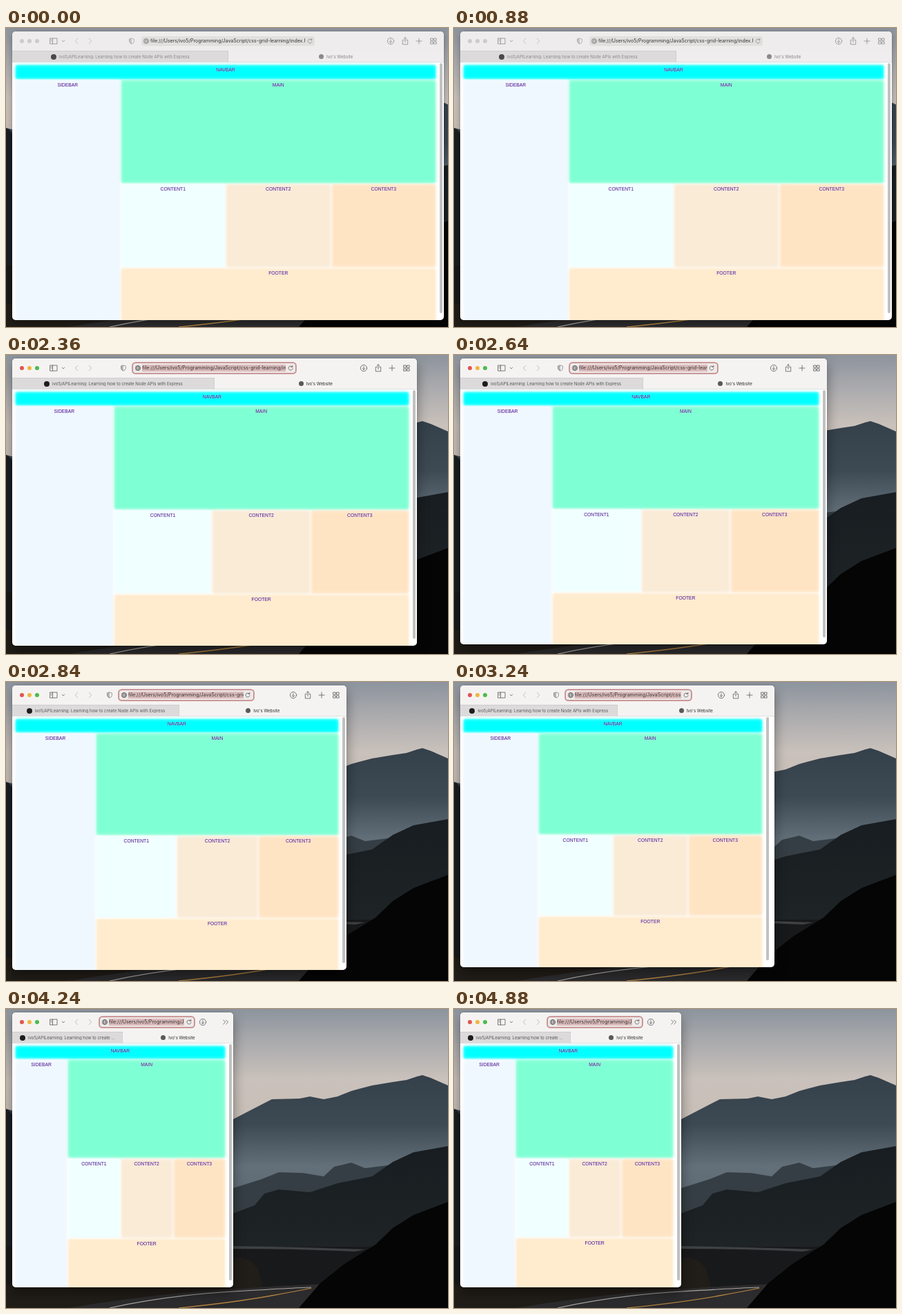
An HTML page for the animation above (4920 ms loop, 640x434 px).

```html
<!DOCTYPE html>
<html lang="en">
<head>
<meta charset="utf-8">
<title>Grid resize</title>
<style>
html, body { margin: 0; width: 100%; height: 100%; overflow: hidden; background: #101214; }
body { position: relative; font-family: Inter, sans-serif; }
#desk { position: absolute; left: 0; top: 0; }
#win { position: absolute; left: 9px; top: 5px; border-radius: 5px; overflow: hidden; background: #fff;
  --icon: #8b8989; --dim: #b9b7b7; --tab: #8a8888; --tab2: #858383; }
#shade { position: absolute; left: 9px; top: 5px; border-radius: 5px; box-shadow: 0 0 1px rgba(0,0,0,.6), 0 4px 12px rgba(0,0,0,.3); }
.active #shade { box-shadow: 0 0 1px rgba(0,0,0,.7), 0 8px 18px rgba(0,0,0,.4); }
.active #win { --icon: #5a5959; --dim: #b4b2b2; --tab: #555; --tab2: #2b2a2a; }

#bar { position: absolute; inset: 0 0 auto; height: 28px; background: #eeecec; }
.active #bar { background: #f5f3f2; }
.light { position: absolute; top: 10.8px; width: 6.6px; height: 6.6px; border-radius: 50%; background: #cdcbcb; }
.active .light { background: var(--c); }
.icon { position: absolute; top: 8px; width: 12px; height: 12px; margin: 0 -6px; overflow: visible;
  fill: none; stroke: var(--icon); stroke-width: .8; stroke-linecap: round; stroke-linejoin: round; }
#url { position: absolute; top: 7px; height: 14px; border-radius: 3.5px; background: #e2e0df; }
.active #url { background: #eeeaea; box-shadow: 0 0 0 1.8px #c78c8c; }
#url span { position: absolute; left: 13px; right: 14px; top: 2px; font-size: 7.03px; line-height: 10px;
  overflow: hidden; white-space: nowrap; color: #333; }
.active #url span { background: #dbbaba; }
#url .icon { top: 1px; }

#tabs { position: absolute; inset: 28px 0 auto; height: 17px; display: flex; background: #efeded; }
.active #tabs { background: #f5f3f2; }
.tab { box-sizing: border-box; width: 50%; padding: 0 11px; display: flex; align-items: center; justify-content: center;
  font-size: 6.08px; color: var(--tab2); box-shadow: inset 0 -.5px #cfcdcd; }
.tab:first-child { background: #dcdada; color: var(--tab); box-shadow: inset -.5px .5px #c6c4c4; }
.tab span { overflow: hidden; white-space: nowrap; text-overflow: ellipsis; }
.dot { flex: none; width: 8px; height: 8px; margin-right: 4px; border-radius: 50%; background: #4b4a4a; }
.active .dot { background: #1d1d1f; }
.dot.small { width: 7px; height: 7px; background: var(--icon) !important; }

#grid { position: absolute; left: 5px; top: 49px; display: grid; gap: 2px; grid-template-columns: repeat(4, minmax(0, 1fr));
  font: 6.75px/13px "Liberation Sans", Arial, sans-serif; text-align: center; color: #551a8b; }
#grid div { background: var(--c); border-radius: 3px; text-shadow: 0 0 2px #dcdcff;
  box-shadow: 0 0 4px var(--c), inset 0 0 4px rgba(255,255,255,.6); }
#thumb { position: absolute; top: 46px; width: 4px; border-radius: 2px; background: #c1c1c1; }
</style>
</head>
<body>
<svg id="desk" width="640" height="434" viewBox="0 0 640 434">
  <defs>
    <linearGradient id="sky" x2="0" y2="1">
      <stop stop-color="#8d949d"/><stop offset=".3" stop-color="#acacae"/>
      <stop offset=".6" stop-color="#c9c1bb"/><stop offset="1" stop-color="#c8beb6"/>
    </linearGradient>
    <linearGradient id="peak" x2="0" y2="1">
      <stop stop-color="#34404a"/><stop offset=".35" stop-color="#3d4953"/>
      <stop offset=".65" stop-color="#637079"/><stop offset="1" stop-color="#5c6870"/>
    </linearGradient>
    <linearGradient id="hill" x2="0" y2="1"><stop stop-color="#181d21"/><stop offset="1" stop-color="#1f2427"/></linearGradient>
  </defs>
  <path fill="url(#sky)" d="M0 0H640V170H0z"/>
  <path fill="url(#peak)" d="M0 145L20 150 200 220 329 160 352 148 385 131 425 130 440 127 460 131 480 127 500 119 530 111 560 106 580 103 595 98 603 96 615 100 640 111V300H0z"/>
  <path fill="#353e44" d="M329 260L370 247 395 237 430 238 460 243 475 229 500 223 520 231 560 226V300H329z"/>
  <path fill="#1b1f22" d="M0 145Q8 148 12 160L60 240 320 300V434H0z"/>
  <path fill="url(#hill)" d="M320 300L360 285 374 268 395 262 440 266 480 253 530 243 560 222 590 208 640 199V360H320z"/>
  <path fill="#18191a" d="M0 345H640V434H0z"/>
  <path fill="#3f4244" d="M329 344Q440 346 520 349L505 352Q420 348 329 348z"/>
  <path fill="#211d18" d="M0 400L200 396 329 362Q350 356 366 378L372 404 180 434H0z"/>
  <path fill="#2c2b2d" d="M90 434Q220 412 340 406 400 401 470 399L430 434z"/>
  <path fill="none" stroke="#a9a5a0" stroke-width="1.2" d="M150 434Q230 416 330 410T442 404"/>
  <path fill="none" stroke="#b0833f" stroke-width="1.3" d="M250 434Q330 426 385 416T442 405"/>
  <path fill="#050505" d="M424 434L455 398 490 370 535 342 560 318 590 299 640 280V434z"/>
</svg>
<div id="shade"></div>
<div id="win">
  <div id="bar">
    <i class="light" style="left:10.7px;--c:#e0564f"></i>
    <i class="light" style="left:21.7px;--c:#f0b63f"></i>
    <i class="light" style="left:32.9px;--c:#4dbb4c"></i>
    <div id="url"><span>file:///Users/ivo5/Programming/JavaScript/css-grid-learning/index.html</span></div>
  </div>
  <div id="tabs">
    <div class="tab"><i class="dot"></i><span>ivo5/APILearning: Learning how to create Node APIs with Express</span></div>
    <div class="tab"><i class="dot small"></i><span>Ivo's Website</span></div>
  </div>
  <div id="grid">
    <div style="--c:cyan;grid-column:1/5">NAVBAR</div>
    <div style="--c:aliceblue;grid-row:2/5">SIDEBAR</div>
    <div style="--c:aquamarine;grid-column:2/5">MAIN</div>
    <div style="--c:azure">CONTENT1</div>
    <div style="--c:antiquewhite">CONTENT2</div>
    <div style="--c:bisque">CONTENT3</div>
    <div style="--c:blanchedalmond;grid-column:2/5">FOOTER</div>
  </div>
  <div id="thumb"></div>
</div>
<script>
const LOOP = 4920, ACTIVATE = 1520, PAGE_LAG = 67;
// [time, edge] pairs for the dragged corner
const RIGHT = [[2160, 634], [2640, 540], [3040, 446], [3240, 464], [3280, 464], [3520, 351], [3600, 352], [3760, 329]];
const BOTTOM = [[2160, 424], [2640, 420], [3240, 414], [3600, 412], [3760, 408], [4300, 404]];
// [right edge, shift] pairs: the address field leaves the centre in narrow windows
const SHIFT = [[329, 35], [352, 28], [464, 16], [540, 0]];

const $ = id => document.getElementById(id);
const px = (el, box) => { for (const k in box) el.style[k] = box[k] + 'px'; };

function lerp(keys, x) {
  const i = keys.findIndex(k => k[0] > x);
  if (i === 0) return keys[0][1];
  if (i < 0) return keys[keys.length - 1][1];
  const [x0, y0] = keys[i - 1], [x1, y1] = keys[i];
  return y0 + (y1 - y0) * (x - x0) / (x1 - x0);
}

function icon(path, box = {}, parent = $('bar')) {
  parent.insertAdjacentHTML('beforeend', `<svg class="icon" viewBox="-6 -6 12 12">${path}</svg>`);
  px(parent.lastChild, box);
  return parent.lastChild;
}
const stroke = (d, extra = '') => `<path d="${d}" ${extra}/>`;

const DIM = 'style="stroke:var(--dim)"';
icon(stroke('M-5-4H5V4H-5zM-1.5-4V4M-3.8-2h1M-3.8 0h1'), {left: 59.5});
icon(stroke('M-1.7-.8L0 .9 1.7-.8'), {left: 74});
icon(stroke('M1.8-3.7L-1.8 0 1.8 3.7', DIM), {left: 93});
icon(stroke('M-1.8-3.7L1.8 0-1.8 3.7', DIM), {left: 113});
const shield = icon(stroke('M0-4L3.4-2.8V.6Q3 3 0 4-3 3-3.4.6V-2.8z', 'stroke-width=".6"') +
  stroke('M0-4V4Q-3 3-3.4.6V-2.8z', 'style="fill:var(--icon);stroke:none" opacity=".4"'));
icon('<circle r="3.6"/><ellipse rx="1.6" ry="3.6"/>' + stroke('M-3.6 0H3.6M-3-2H3M-3 2H3', 'stroke-width=".5"'), {left: 7}, $('url'));
icon(stroke('M2.6-1.6A3 3 0 1 0 3 .6M.8-1.6H2.8V-3.8'), {right: 7.5}, $('url'));

const download = icon('<circle r="4.6"/>' + stroke('M0-2.5V2.3M-1.9.5L0 2.4 1.9.5'));
const share = icon(stroke('M-1.7-1.6H-3.7V4.8H3.7V-1.6H1.7M0 1.6V-5.2M-1.8-3.5L0-5.3 1.8-3.5'));
const plus = icon(stroke('M-4 0H4M0-4V4'));
const tiles = icon(stroke('M-4-4H-.8V-.8H-4zM.9-4H4.1V-.8H.9zM-4 .9H-.8V4.1H-4zM.9.9H4.1V4.1H.9z'));
const more = icon(stroke('M-3.4-3L-.4 0-3.4 3M.6-3L3.6 0 .6 3'));

const show = (el, on) => el.style.display = on ? '' : 'none';

// Distance of each tool from the right edge; absent tools are hidden
function placeTools(right) {
  const [d, s, p, g, m] = right > 400 ? [77, 56, 36, 15] : right > 340 ? [62, , 41, , 11] : [44, , , , 11];
  [[download, d], [share, s], [plus, p], [tiles, g], [more, m]].forEach(([el, x]) => {
    show(el, x);
    if (x) px(el, {right: x});
  });
  show(shield, right > 400);
}

function draw(t) {
  const right = lerp(RIGHT, t), bottom = lerp(BOTTOM, t);
  const width = right - 9, height = bottom - 5, view = bottom - 50;
  const pageRight = Math.min(right, lerp(RIGHT, t - PAGE_LAG));
  document.body.classList.toggle('active', t >= ACTIVATE);
  px($('win'), {width, height});
  px($('shade'), {width, height});

  const field = Math.max(139, width * .4065) - 3;
  const left = width / 2 + lerp(SHIFT, right) - field / 2;
  px($('url'), {left, width: field});
  px(shield, {left: left - 14});
  placeTools(right);

  px($('grid'), {width: pageRight - 26});
  $('grid').style.gridTemplateRows = [.055 * view - 1, .4 * view, .32 * view, .32 * view].map(r => r + 'px').join(' ');
  px($('thumb'), {left: pageRight - 15, height: view - 11});
}

function tick() {
  draw(performance.now() % LOOP);
  requestAnimationFrame(tick);
}
tick();
</script>
</body>
</html>
```
